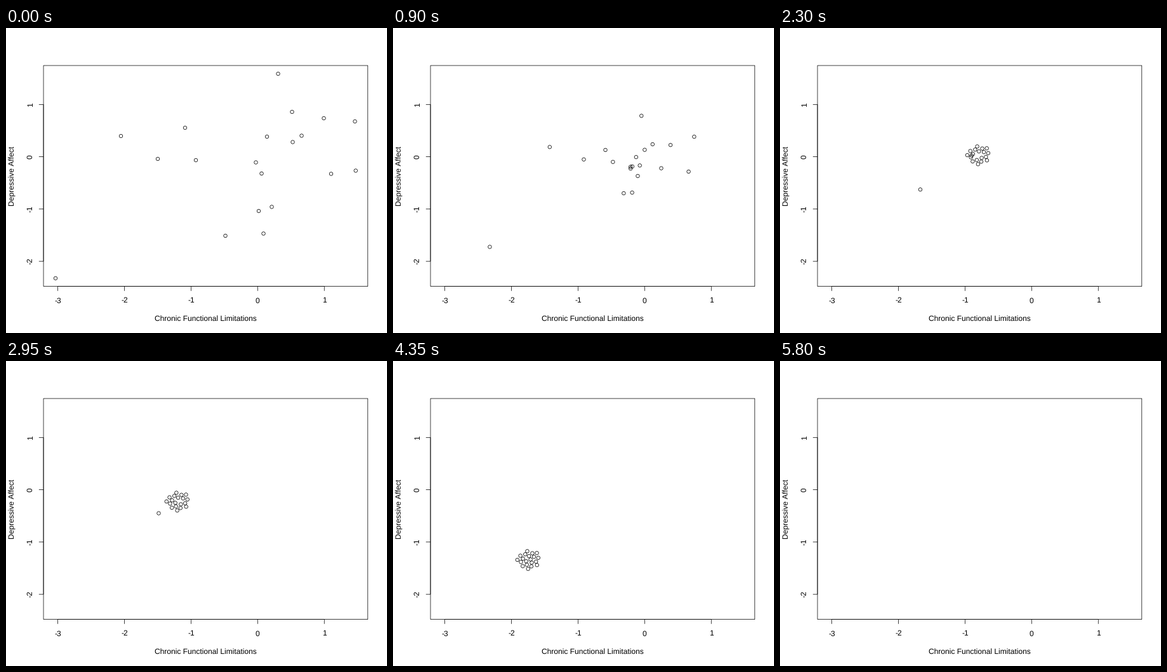
A matplotlib script that plays this animation: 600 px wide and 480 px high, repeating every 6000 ms.

```python
import numpy as np
import matplotlib.pyplot as plt
from matplotlib.animation import FuncAnimation
from matplotlib.patches import Rectangle

W, H, DPI = 600, 480, 100
FRAMES, INTERVAL = 120, 50
PX = 72 / DPI  # one pixel in points
STROKE = 0.75 * PX
LEFT, RIGHT, TOP, BOTTOM = 59.04, 569.76, 59.04, 406.56
TICK, LINE = 7.2, 14.4

plt.rcParams["font.family"] = "Liberation Sans"
plt.rcParams["font.size"] = 12 * PX
plt.rcParams["text.hinting"] = "none"
plt.rcParams["text.hinting_factor"] = 1

# The scatter at rest, in pixels.
scatter = np.array([
    (78, 393.8), (181, 170), (239, 206), (282, 157), (299, 208),
    (345.5, 327), (393.5, 211.5), (398, 288), (402.5, 229), (405.5, 323.5),
    (411, 171), (418.5, 281.5), (428.5, 72), (450.5, 132), (451.5, 179.5),
    (465.5, 169.5), (500.5, 142), (512, 229.5), (549.5, 147), (550.7, 224.5)])

# Path of the middle of the swarm: step, x, y.
path = np.array([
    (0, 388, 213), (18, 377, 213), (34, 350, 196), (59, 270.5, 220.5),
    (75, 238, 273), (99, 193, 354.5), (120, 175, 441)])
times, points = path[:, 0], path[:, 1:]
tangents = np.gradient(points, times, axis=0)

# Each dot heads for its own place in an evenly filled oval.
rank = np.arange(len(scatter))
radius = np.sqrt((rank + 0.5) / len(scatter))
angle = rank * np.pi * (3 - np.sqrt(5))
slots = np.column_stack([19 * radius * np.cos(angle),
                         15 * radius * np.sin(angle)])

offsets = scatter - points[0]
distance = np.hypot(*offsets.T)
speed = 3 + 0.0068 * distance  # far dots hurry


def centre(step):
    """Smooth cubic curve through the path."""
    k = min(np.searchsorted(times, step, side="right") - 1, len(times) - 2)
    h = times[k + 1] - times[k]
    u = (step - times[k]) / h
    return ((1 + 2 * u) * (1 - u) ** 2 * points[k]
            + u * (1 - u) ** 2 * h * tangents[k]
            + u * u * (3 - 2 * u) * points[k + 1]
            + u * u * (u - 1) * h * tangents[k + 1])


def positions(step):
    left = np.clip(1 - speed * step / distance, 0, 1)[:, None]
    return centre(step) + left * offsets + (1 - left) * slots


fig = plt.figure(figsize=(W / DPI, H / DPI), dpi=DPI, facecolor="white")
ax = fig.add_axes([0, 0, 1, 1])
ax.set_xlim(0, W)
ax.set_ylim(H, 0)
ax.axis("off")


def segment(x0, y0, x1, y1):
    ax.plot([x0, x1], [y0, y1], color="black", lw=STROKE, snap=False,
            solid_capstyle="butt")


def label(x, y, text, turn=0):
    ax.text(x, y, text, color="black", ha="center", va="baseline",
            rotation=turn, rotation_mode="anchor")


def plot_area(**style):
    return Rectangle((LEFT, TOP), RIGHT - LEFT, BOTTOM - TOP, **style)


def x_pixel(v):
    return 396.3 + 104.95 * v


def y_pixel(v):
    return 202.6 - 82.27 * v


ax.add_patch(plot_area(fill=False, edgecolor="black", lw=STROKE, snap=False))

segment(x_pixel(-3), BOTTOM, x_pixel(1), BOTTOM)
for v in range(-3, 2):
    segment(x_pixel(v), BOTTOM, x_pixel(v), BOTTOM + TICK)
    label(x_pixel(v), BOTTOM + 1.8 * LINE, str(v))

segment(LEFT, y_pixel(-2), LEFT, y_pixel(1))
for v in range(-2, 2):
    segment(LEFT, y_pixel(v), LEFT - TICK, y_pixel(v))
    label(LEFT - 1.2 * LINE, y_pixel(v), str(v), 90)

label((LEFT + RIGHT) / 2, BOTTOM + 3.8 * LINE, "Chronic Functional Limitations")
label(LEFT - 3.14 * LINE, (TOP + BOTTOM) / 2, "Depressive Affect", 90)

dots = ax.scatter(*scatter.T, s=(5.4 * PX) ** 2, marker="o",
                  facecolors="none", edgecolors="black", linewidths=STROKE)
dots.set_snap(False)
dots.set_clip_path(plot_area(transform=ax.transData))


def update(step):
    dots.set_offsets(positions(step))
    return [dots]


anim = FuncAnimation(fig, update, frames=FRAMES, interval=INTERVAL,
                     repeat=True, repeat_delay=0, blit=False)
plt.show()
```
